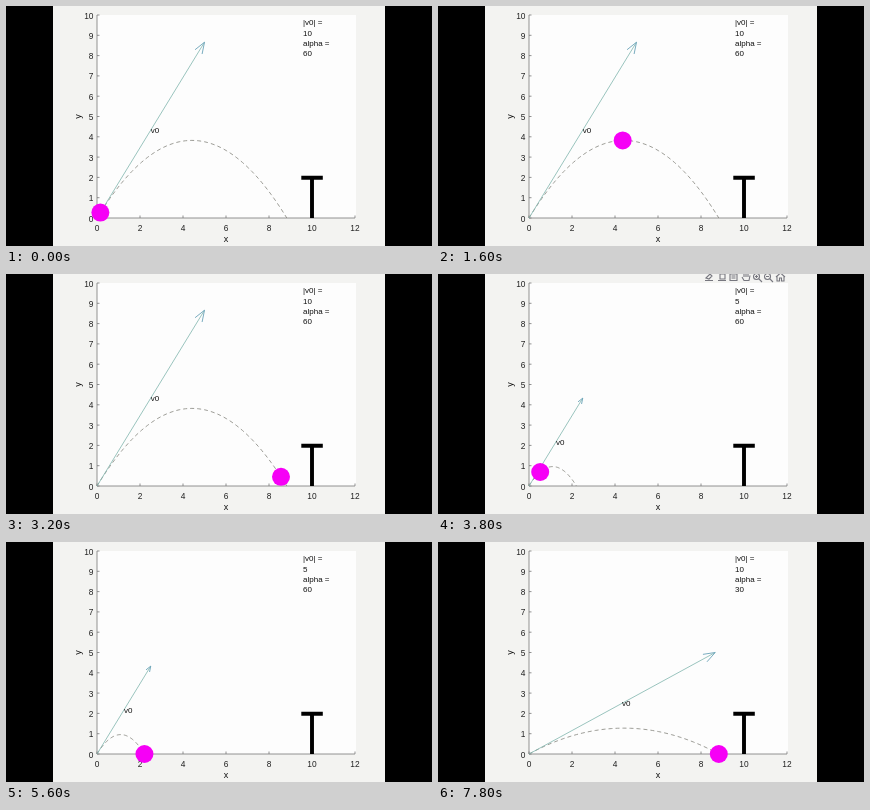
These frames come from a looping animation (426x240 px, 7.87 s). An HTML page:

```html
<!DOCTYPE html>
<html lang="en">
<head>
<meta charset="utf-8">
<title>Projectile motion</title>
<style>
  html, body { margin: 0; width: 100%; height: 100%; overflow: hidden; background: #000; }
  svg { display: block; width: 100%; height: 100%; }
  text { font: 8px "Liberation Sans", Arial, sans-serif; fill: #111; dominant-baseline: central; }
  path { fill: none; }
  #axes text { font-size: 8.4px; fill: #222; }
  .label { font-size: 9px; }
  .mid { text-anchor: middle; }
  .end { text-anchor: end; }
</style>
</head>
<body>
<svg viewBox="0 0 426 240">
  <rect x="47" width="332" height="240" fill="#f3f3f1"/>
  <rect x="91" y="9" width="259" height="203" fill="#fdfdfd"/>
  <g id="axes"><path id="ticks" stroke="#777" stroke-width=".8"/></g>
  <text class="mid label" x="220" y="233">x</text>
  <text class="mid label" transform="translate(72 110.5) rotate(-90)">y</text>
  <text x="297" y="16.5">|v0| =</text><text id="speed" x="297" y="27"></text>
  <text x="297" y="37.3">alpha =</text><text id="angle" x="297" y="47.6"></text>
  <g id="tools" fill="none" stroke="#77777f" stroke-width="1.1">
    <path d="M267 6.500h8M268 4l4-4 2 2-3 3z"/>
    <path d="M280 6.500h8M282 5V0h5v5z"/>
    <path d="M292 0h7v6.500h-7zM293.500 2h4M293.500 4h4"/>
    <path d="M304 3l2 3.500h5l1-5M306 3V0M308 3V0M310 3V0"/>
    <circle cx="318.500" cy="2.500" r="3"/><path d="M321 5l3 3M317 2.500h3M318.500 1v3"/>
    <circle cx="329.500" cy="2.500" r="3"/><path d="M332 5l3 3M328 2.500h3"/>
    <path d="M338 3l4.500-4 4.500 4M339 2.500v4.500h2.500v-3h2v3h2.500v-4.500"/>
  </g>
  <path id="arc" stroke="#85857d" stroke-width=".8" stroke-dasharray="4 3"/>
  <path id="arrow" stroke="#80b5ae" stroke-width=".8"/>
  <path id="head" stroke="#6aa3b8" stroke-width=".9"/>
  <text id="name">v0</text>
  <path d="M295.300 171.700h21.500M306 171.700V212" stroke="#000" stroke-width="3.900"/>
  <circle id="ball" r="9" fill="#f600f6"/>
</svg>
<script>
const el = id => document.getElementById(id);
const set = (id, attrs) => { for (const k in attrs) el(id).setAttribute(k, attrs[k]); };
const px = x => 91 + 21.5 * x, py = y => 212 - 20.3 * y;
const G = 9.81, RATE = 0.000525, FRAMES = 118, LOOP = 7870;

// first: step at which the shot appears; start: launch time in ms
const shots = [
  { v: 10, deg: 60, first: 0, start: -60 },
  { v: 5, deg: 60, first: 52, start: 3403 },
  { v: 10, deg: 30, first: 85, start: 5583 },
];

function drawAxes() {
  let ticks = 'M91 9V212H349', labels = '';
  for (let x = 0; x <= 12; x += 2) {
    ticks += `M${px(x)} 212v-2.5`;
    labels += `<text class="mid" x="${px(x)}" y="221.5">${x}</text>`;
  }
  for (let y = 0; y <= 10; y++) {
    ticks += `M91 ${py(y)}h2.5`;
    labels += `<text class="end" x="87.5" y="${py(y) + 0.5}">${y}</text>`;
  }
  set('ticks', { d: ticks });
  el('axes').insertAdjacentHTML('beforeend', labels);
}

function prepare(s) {
  const a = s.deg * Math.PI / 180;
  s.vx = s.v * Math.cos(a);
  s.vy = s.v * Math.sin(a);
  s.flight = 2 * s.vy / G;
  s.at = t => [px(s.vx * t), py(s.vy * t - G / 2 * t * t)];
}

function showShot(s) {
  const arc = Array.from({ length: 61 }, (_, i) => s.at(s.flight * i / 60));
  // The vector is drawn with the components of v0 as axis units
  const tx = px(s.vx), ty = py(s.vy), dx = tx - 91, dy = ty - 212;
  const barb = k => `${tx - 0.055 * dx - k * dy} ${ty - 0.055 * dy + k * dx}`;
  set('arc', { d: 'M' + arc.join('L') });
  set('arrow', { d: `M91 212L${tx} ${ty}` });
  set('head', { d: `M${barb(0.02)}L${tx} ${ty}L${barb(-0.02)}` });
  set('name', { x: 91 + dx / 2, y: 212 + dy / 2 + 0.7 });
  el('speed').textContent = s.v;
  el('angle').textContent = s.deg;
}

let current;
function draw() {
  const step = Math.min(FRAMES - 1, Math.floor((performance.now() % LOOP + 4) * 0.015));
  const ms = step / 0.015;
  const shot = shots.findLast(s => step >= s.first);
  if (shot !== current) showShot(current = shot);
  const t = Math.min(shot.flight, Math.max(0, (ms - shot.start) * RATE));
  const [cx, cy] = shot.at(t);
  set('ball', { cx, cy });
  set('tools', { visibility: step >= 52 && step < 64 ? 'visible' : 'hidden' });
  requestAnimationFrame(draw);
}

drawAxes();
shots.forEach(prepare);
draw();
</script>
</body>
</html>
```
